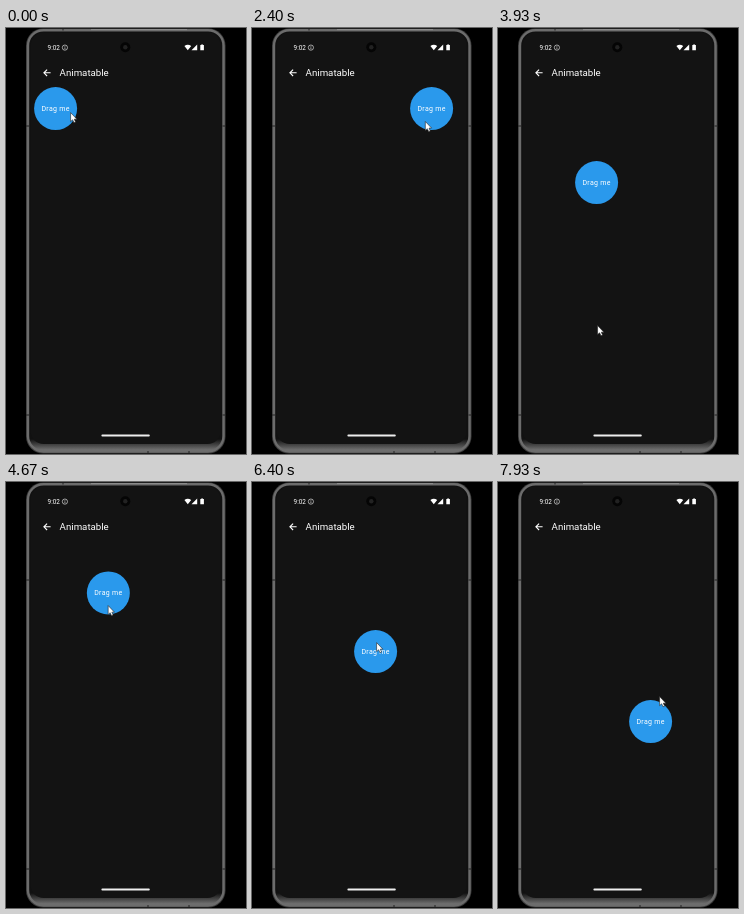
These frames come from a looping animation (240 by 426 pixels, 8000 ms). An HTML page:

```html
<!DOCTYPE html>
<html lang="en">
<head>
<meta charset="utf-8">
<title>Animatable</title>
<style>
  html, body { margin: 0; width: 100%; height: 100%; overflow: hidden; background: #000; }
  svg { display: block; width: 240px; height: 426px; font-family: Roboto, sans-serif; }
</style>
</head>
<body>
<svg viewBox="0 0 240 426" fill="#fff">
  <defs>
    <linearGradient id="bezel" gradientUnits="userSpaceOnUse" x1="0" y1="411" x2="0" y2="422">
      <stop stop-color="#111"/>
      <stop offset="1" stop-color="#707070"/>
    </linearGradient>
  </defs>

  <!-- phone body -->
  <rect x="20" y=".5" width="199.5" height="425" rx="17" fill="#3c3c3c"/>
  <rect x="22" y="2.2" width="195.5" height="421.3" rx="15.5" fill="url(#bezel)" stroke="#6c6c6c" stroke-width="2.4"/>
  <rect x="24.6" y="4.6" width="190" height="411.5" rx="13" fill="#131313"/>
  <path d="M20 98h3M216.5 98h3M20 387h3M216.5 387h3M57 .5v2M142 423v2.5M183 423v2.5" stroke="#222"/>
  <path d="M85 1.6H181" stroke="#999" stroke-width=".8"/>

  <g transform="translate(-.4 -.4)">
    <circle cx="119.7" cy="19.7" r="5" fill="#050505"/>
    <circle cx="119.7" cy="19.7" r="2.2" fill="#222"/>

    <!-- status bar -->
    <text x="42" y="22.3" font-size="6.4">9:02</text>
    <circle cx="59.3" cy="20" r="2.6" fill="none" stroke="#ddd" stroke-width=".7"/>
    <path d="M59.3 18.4v.7M59.3 19.7v1.8" stroke="#ddd" stroke-width=".7"/>
    <path d="M178.8 18.3Q182.2 15.8 185.6 18.3L182.2 22.7ZM191.6 17V22.7H185.9Z"/>
    <path d="M195.6 16.8h1.8v.7h.9v5.2h-3.6v-5.2h.9Z"/>

    <!-- app bar and home handle -->
    <path d="M45 45.2H38.4M41.5 42L38.3 45.2L41.5 48.4" fill="none" stroke="#fff" stroke-width="1.1"/>
    <text x="54" y="48.8" font-size="9.7">Animatable</text>
    <rect x="95.8" y="406.8" width="48.4" height="2" rx="1" fill="#eee"/>

    <g id="ball">
      <circle r="21.5" fill="#2a99ec"/>
      <text y="2.5" font-size="7" letter-spacing=".3" text-anchor="middle">Drag me</text>
    </g>
    <path id="cursor" d="M0 0V9L2 7.2L3.4 10.2L5 9.5L3.7 6.6H6.3Z" stroke="#222" stroke-width=".6"/>
  </g>
</svg>
<script>
const FPS = 15, LOOP = 8000;

// Turning points of the drags and flings: [tick, x, y].
const ballPath = [
  [0, 50, 81], [15, 104, 241], [17, 110, 250], [24, 150, 112], [28, 155, 130], [36, 180, 81],
  [40, 180, 81], [51, 84, 382], [54, 84, 382], [59, 99, 155], [61, 100, 81], [66, 98, 81],
  [81, 125, 254], [85, 125, 254], [89, 82, 172], [91, 140, 142], [96, 124, 170],
  [105, 74, 204], [118, 136, 350], [119, 153, 240]
];
// Pointer relative to the ball; it strays when the ball is flung.
const pointerOffset = [
  [0, 15, 4], [15, -7, 10], [40, -6, 13], [54, 0, 6], [59, 1, 143], [61, 0, 217],
  [66, 0, 7], [81, -1, 39], [83, -1, 39], [85, 1, -9], [118, 1, -9], [119, 9, -25]
];

// Monotone cubic interpolation: smooth, without overshooting any key.
function sample(keys, tick, axis) {
  const last = keys.length - 1;
  const slope = i => (keys[i + 1][axis] - keys[i][axis]) / (keys[i + 1][0] - keys[i][0]);
  const tangent = i => {
    if (i === 0 || i === last) return 0;
    const a = slope(i - 1), b = slope(i);
    return a * b > 0 ? 2 * a * b / (a + b) : 0;
  };
  let i = 0;
  while (i < last - 1 && keys[i + 1][0] <= tick) i++;
  const span = keys[i + 1][0] - keys[i][0];
  const u = (tick - keys[i][0]) / span, v = 1 - u;
  return keys[i][axis] * (1 + 2 * u) * v * v + keys[i + 1][axis] * u * u * (3 - 2 * u)
    + span * u * v * (tangent(i) * v - tangent(i + 1) * u);
}

const pointAt = (keys, tick) => [1, 2].map(axis => sample(keys, tick, axis));

function place(id, [x, y]) {
  document.getElementById(id).setAttribute("transform", `translate(${x.toFixed(2)} ${y.toFixed(2)})`);
}

function draw() {
  // The small offset absorbs tick times rounded to 10 ms.
  const tick = Math.floor((performance.now() % LOOP + 4) * FPS / 1000) % (LOOP * FPS / 1000);
  const [x, y] = pointAt(ballPath, tick);
  const [dx, dy] = pointAt(pointerOffset, tick);
  place("ball", [x, y]);
  place("cursor", [x + dx, y + dy]);
  requestAnimationFrame(draw);
}
draw();
</script>
</body>
</html>
```
